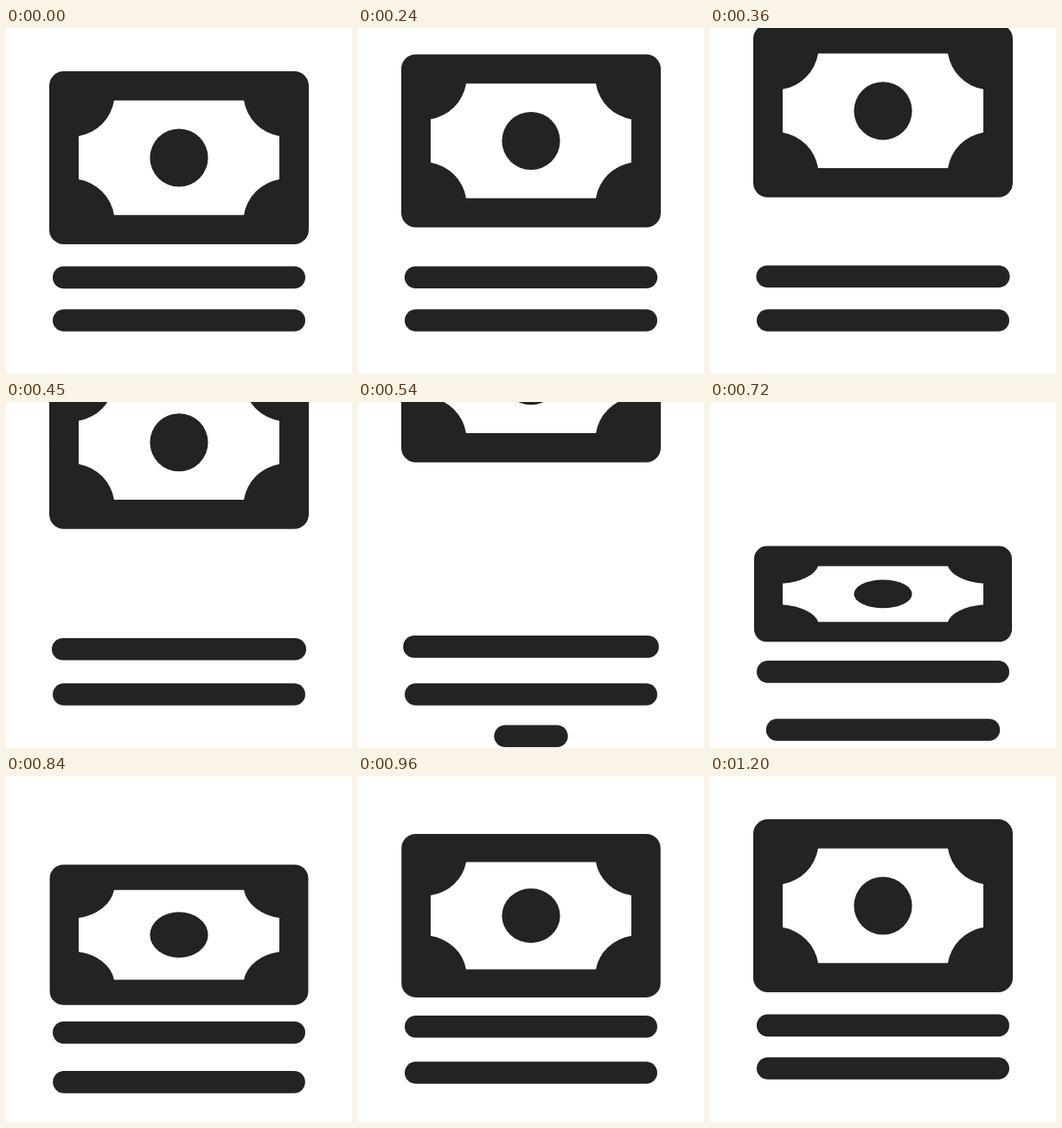
Write an HTML page that moves like this. It is 400 px wide and 400 px high and loops after 3.23 s.

```html
<!DOCTYPE html>
<html lang="en">
<head>
<meta charset="utf-8">
<title>Banknotes</title>
<style>
  html, body { margin: 0; width: 100%; height: 100%; overflow: hidden; background: #fff; }
  svg { display: block; width: 100%; height: 100%; }
</style>
</head>
<body>
<svg viewBox="0 0 400 400" fill="#232323">
  <defs>
    <g id="face">
      <path fill="#fff" d="M-75-66.2H75A50 50 0 0 0 116-25V25A50 50 0 0 0 75 66.2H-75A50 50 0 0 0-116 25V-25A50 50 0 0 0-75-66.2Z"/>
      <circle r="33.6"/>
    </g>
  </defs>
  <g id="leaving">
    <rect x="50" y="50" width="300" height="200" rx="16.7"/>
    <use href="#face" transform="translate(200 150)"/>
  </g>
  <rect id="rising"/>
  <use id="risingFace" href="#face"/>
  <rect id="middle"/>
  <rect id="fresh"/>
</svg>
<script>
const LOOP = 3230, STEP = 30, HALF = 600, THICK = 25.6;
const SLOT = { bill: 150, upper: 288.4, lower: 338, below: 386.3 };
const el = id => document.getElementById(id);
const leaving = el('leaving'), rising = el('rising'), risingFace = el('risingFace');
const middle = el('middle'), fresh = el('fresh');

const part = (t, start, length) => Math.min(1, Math.max(0, (t - start) / length));
const mix = (a, b, k) => a + (b - a) * k;
const easeOut = (u, n) => 1 - (1 - u) ** n;

// cubic-bezier(x1, 0, x2, 1)
function bezier(x1, x2, x) {
  let lo = 0, hi = 1;
  for (let i = 0; i < 24; i++) {
    const p = (lo + hi) / 2, q = 1 - p;
    if (3 * q * q * p * x1 + 3 * q * p * p * x2 + p ** 3 < x) lo = p; else hi = p;
  }
  return lo * lo * (3 - 2 * lo);
}

function place(node, y, half, height, radius) {
  const box = { x: 200 - half, y: y - height / 2, width: 2 * half, height, rx: radius };
  for (const key in box) node.setAttribute(key, box[key]);
}
const bar = (node, y, half) => place(node, y, half, THICK, THICK / 2);
const show = (node, on) => node.setAttribute('visibility', on ? 'visible' : 'hidden');

function draw(t) {
  const first = part(t, 0, HALF), second = part(t, HALF, HALF);

  // top note flies off
  leaving.setAttribute('transform', `translate(0 ${-23.5 * first - 227.7 * first ** 3.4})`);
  show(leaving, t < HALF);

  // upper bar lifts, then unfolds into the next note
  const lift = SLOT.upper - 8.4 * first ** 4;
  const y = mix(lift, SLOT.bill, easeOut(second, 2.65));
  const half = mix(146 + 2.5 * first ** 3, 150, easeOut(second, 2));
  const open = easeOut(second, 3);
  place(rising, y, half, mix(THICK, 200, open), mix(THICK / 2, 16.7, open));
  risingFace.setAttribute('transform', `translate(200 ${y}) scale(1 ${open})`);
  show(risingFace, open > 0);

  // lower bar takes the upper slot
  bar(middle, mix(SLOT.lower, SLOT.upper, easeOut(part(t, HALF, 480), 2.6)), 146);

  // new bar grows below and rises
  const grow = easeOut(part(t, 510, 370), 3);
  bar(fresh, mix(SLOT.below, SLOT.lower, bezier(0.4, 0.13, second)), mix(THICK / 2, 146, grow));
  show(fresh, grow > 0);
}

const start = performance.now();
function tick() {
  const t = (performance.now() - start) % LOOP;
  draw(Math.floor(t / STEP) * STEP);
  requestAnimationFrame(tick);
}
draw(0);
requestAnimationFrame(tick);
</script>
</body>
</html>
```
